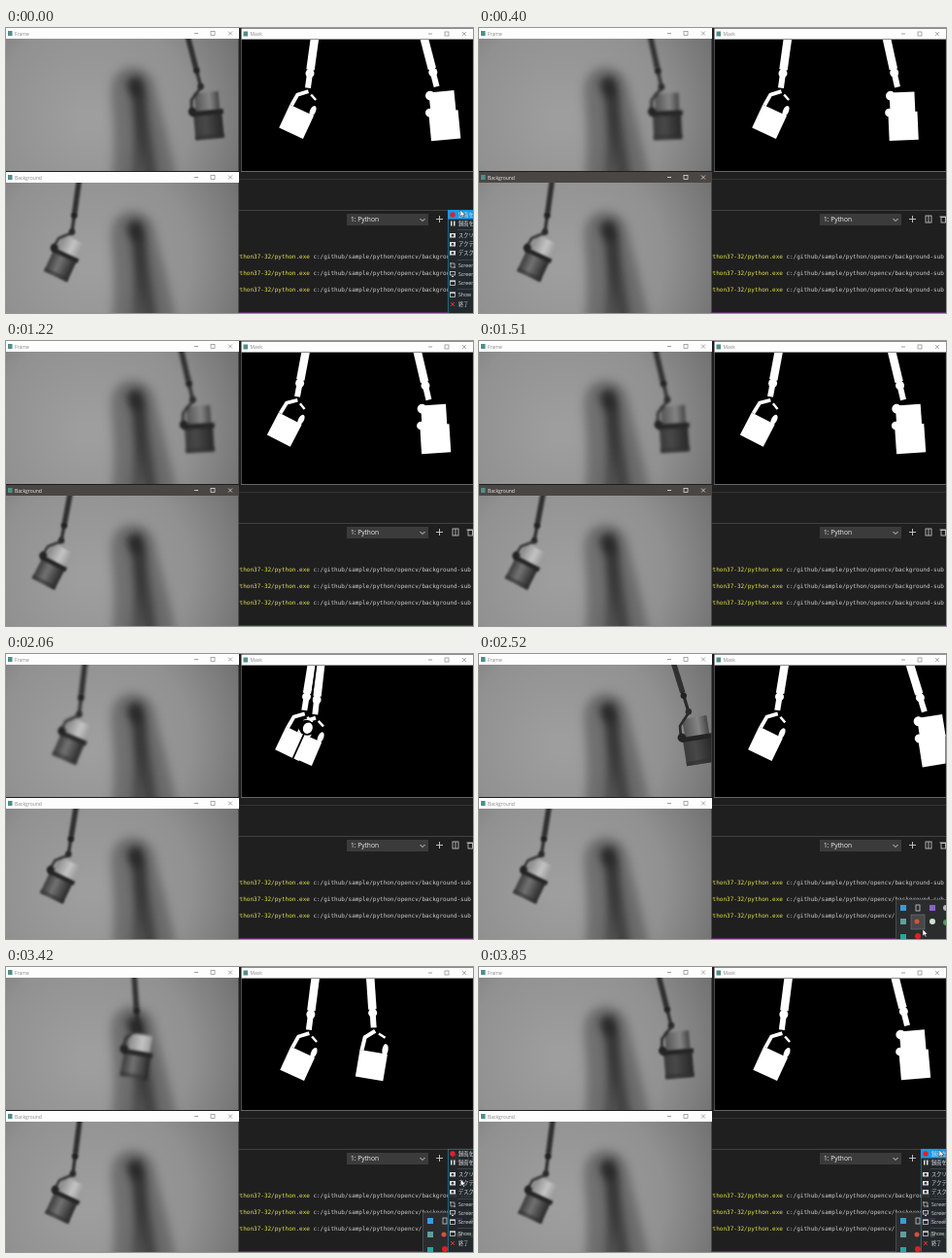
An HTML page with a canvas for the animation above (3.94 s loop, 481 px wide and 293 px high).

```html
<!DOCTYPE html>
<html lang="en">
<head>
<meta charset="utf-8">
<title>Background subtraction</title>
<style>
html, body { margin: 0; width: 100%; height: 100%; overflow: hidden; background: #1e1e1e; }
canvas { display: block; }
</style>
</head>
<body>
<canvas id="stage" width="481" height="293"></canvas>
<script>
const ctx = document.getElementById('stage').getContext('2d');
const LOOP = 3940;
const SANS = '"Open Sans", "Noto Sans CJK JP", sans-serif';
const MONO = '"DejaVu Sans Mono", monospace';

const STEPS = [0, 40, 160, 290, 410, 530, 650, 780, 900, 1000, 1110, 1220, 1320, 1420, 1510, 1600, 1690,
  1770, 1870, 1970, 2060, 2170, 2260, 2340, 2430, 2520, 2600, 2680, 2760, 2840,
  2940, 3060, 3150, 3240, 3330, 3420, 3510, 3600, 3690, 3770, 3850];
// Turning points of the swing, alternately left and right.
const TURNS = [-480, 120, 740, 1380, 1920, 2520, 3120, 3720, 4320];
const LEFT = 45, RIGHT = 225;
// Stored backgrounds: [from, x, y]
const STORED = [[0, 60, 88], [780, 48, 83], [1970, 56, 84], [2940, 58, 86], [3240, 61, 91]];

const lerp = (a, b, u) => a + (b - a) * Math.min(1, Math.max(0, u));
const lastBefore = (list, t, key = v => v) => list.filter(v => key(v) <= t).pop();

function rect(x, y, w, h, fill) {
  ctx.fillStyle = fill;
  ctx.fillRect(x, y, w, h);
}
function frame(x, y, w, h, stroke, width = 0.8) {
  ctx.strokeStyle = stroke;
  ctx.lineWidth = width;
  ctx.strokeRect(x, y, w, h);
}
function dot(x, y, r, fill, ry = r) {
  ctx.fillStyle = fill;
  ctx.beginPath();
  ctx.ellipse(x, y, r, ry, 0, 0, 7);
  ctx.fill();
}
function line(points, stroke, width) {
  ctx.strokeStyle = stroke;
  ctx.lineWidth = width;
  ctx.beginPath();
  points.forEach(p => ctx.lineTo(...p));
  ctx.stroke();
}
function text(str, x, y, size, fill, family = SANS) {
  ctx.font = `${size}px ${family}`;
  ctx.fillStyle = fill;
  ctx.fillText(str, x, y);
}
function clipped(x, y, w, h, draw) {
  ctx.save();
  ctx.beginPath();
  ctx.rect(x, y, w, h);
  ctx.clip();
  draw();
  ctx.restore();
}

function swing(t) {
  const i = TURNS.findIndex(v => v > t) - 1;
  const u = (t - TURNS[i]) / (TURNS[i + 1] - TURNS[i]);
  const c = Math.cos(Math.PI * u) * (i % 2 ? 1 : -1);
  return {
    x: (LEFT + RIGHT) / 2 + c * (RIGHT - LEFT) / 2,
    speed: Math.sin(Math.PI * u)
  };
}

function makePose(x, y) {
  const p = (x - LEFT) / (RIGHT - LEFT);
  y ??= 87 + 2 * p + 14 * p * (1 - p);
  const rot = (28 - 37 * p) * Math.PI / 180, size = 0.96 + 0.14 * p;
  const cos = Math.cos(rot) * size, sin = Math.sin(rot) * size;
  const joint = [x - 4 * cos + 28 * sin, y - 4 * sin - 28 * cos];
  const top = [x + 19 - 44 * p, 8];
  const along = u => [lerp(top[0], joint[0], u), lerp(top[1], joint[1], u)];
  return { x, y, p, rot, size, top, joint, along };
}
function local(pose, draw) {
  ctx.save();
  ctx.translate(pose.x, pose.y);
  ctx.rotate(pose.rot);
  ctx.scale(pose.size, pose.size);
  draw();
  ctx.restore();
}

function microphone(pose) {
  const { top, joint, along, p } = pose;
  line([top, along(0.62)], '#303030', 5.5);
  line([along(0.6), joint], '#292929', 3.2);
  dot(...along(0.68), 3.2, '#222');
  dot(...joint, 3.2, '#2b2b2b');
  local(pose, () => {
    const cap = ctx.createLinearGradient(-12, 0, 13, 0);
    cap.addColorStop(0, p > 0.5 ? '#505050' : '#858585');
    cap.addColorStop(0.6, p > 0.5 ? '#858585' : '#c4c4c4');
    cap.addColorStop(1, p > 0.5 ? '#3c3c3c' : '#989898');
    rect(-11, -22, 23, 19, cap);
    const body = ctx.createLinearGradient(-14, 0, 14, 0);
    body.addColorStop(0, '#3a3a3a');
    body.addColorStop(0.4, p > 0.5 ? '#484848' : '#727272');
    body.addColorStop(1, '#262626');
    rect(-13.5, -3, 27, 25, body);
    rect(-15, -5, 30, 4.5, '#242424');
    rect(-13.5, 18, 27, 4, '#30303090');
    line([[-4, -27], [-14, -16], [-15, -3]], '#2c2c2c', 2.5);
    dot(-14, -5, 4, '#242424');
  });
}

function person() {
  ctx.filter = 'blur(5px)';
  ctx.fillStyle = 'rgba(58,58,58,.44)';
  ctx.beginPath();
  ctx.moveTo(108, 165);
  ctx.bezierCurveTo(116, 100, 106, 78, 109, 58);
  ctx.bezierCurveTo(113, 34, 147, 34, 153, 58);
  ctx.bezierCurveTo(160, 90, 168, 115, 178, 165);
  ctx.fill();
  ctx.filter = 'blur(4px)';
  line([[130, 52], [136, 66], [139, 90], [144, 120], [150, 160]], 'rgba(25,25,25,.5)', 14);
  line([[132, 54], [138, 72], [137, 110], [134, 160]], 'rgba(25,25,25,.4)', 9);
  dot(134, 61, 8, 'rgba(20,20,20,.4)', 11);
  ctx.filter = 'none';
}

function camera(top, height, pose, blur) {
  clipped(0, top, 239.5, height, () => {
    ctx.translate(0, top - 11);
    const wall = ctx.createRadialGradient(85, 95, 10, 95, 85, 175);
    wall.addColorStop(0, '#9e9e9e');
    wall.addColorStop(0.55, '#919191');
    wall.addColorStop(1, '#6b6b6b');
    rect(0, 11, 240, 140, wall);
    person();
    ctx.filter = `blur(${blur}px)`;
    microphone(pose);
    ctx.filter = 'none';
  });
}

function silhouette(pose) {
  const { top, joint, along, p } = pose;
  line([top, along(0.65)], '#fff', 8.5);
  line([along(0.6), joint], '#fff', 6);
  dot(...along(0.72), 4.5, '#fff');
  local(pose, () => {
    rect(-14, -4, 28, 27, '#fff');
    if (p > 0.5) {
      rect(-12, -23, 24, 21, '#fff');
      dot(-11, -20, 4.5, '#fff');
      dot(-13, -4, 4, '#fff');
    } else {
      line([[-2, -25], [-11, -17], [-12, -4]], '#fff', 4);
      line([[2, -23], [9, -20]], '#fff', 2.5);
      dot(11, -8, 3, '#fff', 6);
    }
  });
}

function mask(live, stored) {
  rect(243, 12, 237.5, 135, '#000');
  const gap = Math.abs(live.x - stored.x);
  if (gap < 3) return;
  clipped(243, 12, 237.5, 135, () => {
    ctx.translate(243, 0);
    silhouette(stored);
    silhouette(live);
    if (gap > 32) return;
    // Where both overlap, a dark seam separates them.
    const mid = makePose((live.x + stored.x) / 2, (live.y + stored.y) / 2);
    line([mid.top, mid.joint], '#000', 2);
    local(mid, () => {
      dot(0, -12, 9, '#000', 8);
      dot(1, -12, 5, '#fff', 6);
      line([[0, -5], [0, 25]], '#000', 1.8);
    });
  });
}

function titleBar(x, y, w, label, active) {
  const ink = active ? '#eee' : '#888';
  rect(x, y, w, 11, active ? '#4a4644' : '#fdfdfd');
  rect(x + 2, y + 3, 4.5, 5, '#4f8f88');
  text(label, x + 9, y + 7.6, 5, ink);
  const right = x + w - 9, cy = y + 5.5;
  line([[right - 37, cy], [right - 33, cy]], ink, 0.8);
  frame(right - 20, cy - 2, 4, 4, ink, 0.7);
  line([[right - 2, cy - 2], [right + 2, cy + 2]], ink, 0.7);
  line([[right - 2, cy + 2], [right + 2, cy - 2]], ink, 0.7);
}

function terminal() {
  rect(240, 147, 241, 146, '#1f1f20');
  rect(240, 155, 241, 0.8, '#39393a');
  rect(240, 187, 241, 0.8, '#4a4a4b');
  rect(351, 191, 84, 12, '#3b3b3c');
  text('1: Python', 355, 199.4, 6.6, '#eee');
  line([[426.5, 196], [429, 198.5], [431.5, 196]], '#ddd', 0.9);
  line([[443, 196.5], [450, 196.5]], '#ccc', 0.9);
  line([[446.5, 193], [446.5, 200]], '#ccc', 0.9);
  frame(460, 193, 6, 7, '#ccc');
  line([[463, 193], [463, 200]], '#ccc', 0.8);
  frame(476, 194.5, 4.5, 5.5, '#ccc');
  line([[474.5, 194], [481, 194]], '#ccc', 0.9);
  clipped(240, 200, 241, 93, () => {
    for (const y of [236.5, 254, 271.3]) {
      text('ython37-32/python.exe', 237, y, 6, '#e6e34a', MONO);
      text('c:/github/sample/python/opencv/background-sub', 316.4, y, 6, '#ccc', MONO);
    }
  });
  rect(240, 292, 241, 1, '#5b2a66');
}

function tray(hover) {
  rect(429, 252, 52, 41, '#2b2c2e');
  frame(429.5, 252.5, 54, 44, '#55585a', 0.7);
  if (hover) {
    rect(445, 268, 14, 15, '#46484a');
    frame(445, 268, 14, 15, '#777', 0.6);
  }
  rect(434, 258, 6, 6, '#3b9bdc');
  frame(450, 258, 4, 6, '#ccc');
  rect(464, 258, 6, 6, '#8a63c4');
  dot(481, 261, 3, '#bbb');
  rect(434, 272, 6, 6, '#5f9f9a');
  dot(451, 275, 2.5, '#d8503c');
  dot(467, 275, 3, '#cfe3cf');
  dot(481, 276, 3, '#4f9b60');
  rect(434, 288, 6, 5, '#2aa5a0');
  dot(452, 290, 3, '#e02020');
}

const MENU = [
  [192, 'record', '録画を'], [201, 'pause', '録画を'],
  [213, 'photo', 'スクリーン'], [222, 'photo', 'アクティブ'], [231, 'photo', 'デスクトップ'],
  [244, 'crop', 'Screen'], [253, 'screen', 'Screen'], [262, 'window', 'Screen'],
  [274, 'window', 'Show F'], [284, 'quit', '終了']
];
const ICONS = {
  record: y => dot(460, y, 2.7, '#e0202c'),
  pause: y => [458, 461].forEach(x => rect(x, y - 2.5, 1.5, 5, '#ddd')),
  photo: y => { rect(457, y - 2, 6, 4.5, '#ddd'); dot(460, y + 0.3, 1.3, '#333'); },
  crop: y => { line([[458, y - 3], [458, y + 2], [463, y + 2]], '#bbb', 0.8); line([[457, y - 2], [462, y - 2], [462, y + 3]], '#bbb', 0.8); },
  screen: y => { frame(457.5, y - 2.5, 5, 3.5, '#ccc'); rect(459, y + 2, 2, 1, '#ccc'); },
  window: y => { frame(457.5, y - 2, 5, 4.5, '#ccc'); rect(457, y - 2.5, 6, 1.5, '#ccc'); },
  quit: y => { line([[458, y - 2], [462, y + 2]], '#d33', 1); line([[458, y + 2], [462, y - 2]], '#d33', 1); }
};
function menu(highlight, alpha) {
  ctx.globalAlpha = alpha;
  rect(455, 187, 26, 106, '#22292d');
  ctx.globalAlpha = 1;
  frame(455.3, 187.3, 28, 110, '#27799a', 0.8);
  if (highlight) rect(455, 187, 26, 9.5, '#159be8');
  for (const y of [207, 238, 268]) rect(465, y, 16, 0.5, '#596064');
  for (const [y, icon, label] of MENU) {
    ICONS[icon](y);
    text(label, 466, y + 2, 5.2, '#ddd');
  }
}

function cursor(x, y) {
  ctx.beginPath();
  [[0, 0], [0, 7], [1.7, 5.5], [3, 8], [4, 7.5], [2.8, 5], [5, 5]].forEach(([a, b]) => ctx.lineTo(x + a, y + b));
  ctx.closePath();
  ctx.fillStyle = '#fff';
  ctx.fill();
  ctx.strokeStyle = '#222';
  ctx.lineWidth = 0.5;
  ctx.stroke();
}

function overlays(t) {
  if (t < 40) {
    menu(true, 1);
    cursor(468, 187);
    return;
  }
  if (t < 2340) return;
  if (t >= 2430) tray(t < 2940);
  if (t >= 2940) menu(t >= 3510, 0.82);
  if (t < 3060) cursor(lerp(470, 457, (t - 2340) / 180), lerp(291, 283, (t - 2340) / 180));
  else cursor(lerp(457, 474, (t - 3060) / 540), lerp(279, 188, (t - 3060) / 540));
}

function draw(t) {
  const { x, speed } = swing(t);
  const live = makePose(x);
  const [, storedX, storedY] = lastBefore(STORED, t, s => s[0]);
  const stored = makePose(storedX, storedY);
  rect(0, 0, 481, 293, '#1e1e1e');
  terminal();
  camera(11, 136, live, 0.7 + speed);
  camera(159, 134, stored, 0.9);
  mask(live, stored);
  rect(242, 11, 0.8, 137, '#555');
  rect(242, 147, 239, 0.8, '#777');
  titleBar(0, 0, 240, 'Frame');
  titleBar(242.5, 0.5, 238.5, 'Mask');
  titleBar(0, 148, 240, 'Background', t >= 40 && t < 1770);
  overlays(t);
}

const start = performance.now();
function tick() {
  draw(lastBefore(STEPS, (performance.now() - start) % LOOP));
  requestAnimationFrame(tick);
}
tick();
</script>
</body>
</html>
```
